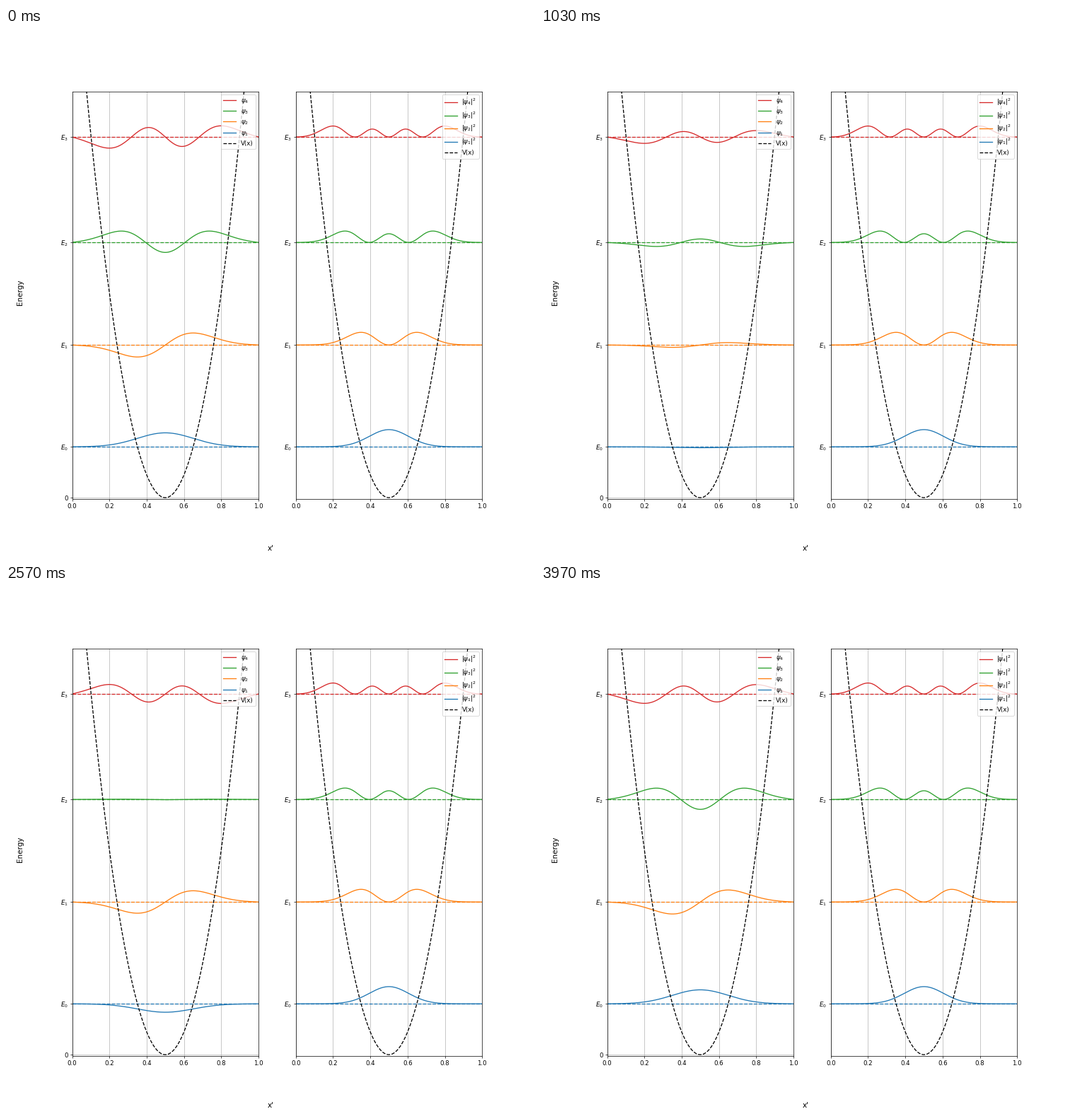
Write a matplotlib script that moves like this. It is 748 by 748 pixels and loops after 4010 ms.

```python
import numpy as np
import matplotlib.pyplot as plt
from matplotlib.animation import FuncAnimation

TICK_MS = 10
TICKS = 401
FPS = 30
STEPS = 120
POINTS = 1000
STATES = 4
COLORS = ["tab:blue", "tab:orange", "tab:green", "tab:red"]
LEFT_SIGNS = [1, -1, 1, -1]  # sign of each state near x = 0

x = np.linspace(0, 1, POINTS)
V = 1000 * (x - 0.5) ** 2


def solve():
    """Lowest states of a harmonic well inside hard walls at 0 and 1."""
    h = x[1] - x[0]
    off = np.full(POINTS - 3, -0.5 / h**2)
    H = np.diag(1 / h**2 + V[1:-1]) + np.diag(off, 1) + np.diag(off, -1)
    energy, vec = np.linalg.eigh(H)
    psi = np.zeros((STATES, POINTS))
    for n in range(STATES):
        v = vec[:, n]
        psi[n, 1:-1] = v * LEFT_SIGNS[n] * np.sign(v[POINTS // 10])
    return energy[:STATES], psi


E, psi = solve()
waves = 100 * psi
density = 2000 * psi**2
times = np.linspace(0, 2 * np.pi / E[0], STEPS)


def draw_panel(ax, curves, label):
    """Draw one panel; return its state curves and what lies above them."""
    lines = [None] * STATES
    for n in reversed(range(STATES)):
        ax.axhline(E[n], color=COLORS[n], ls="--")
        lines[n], = ax.plot(x, E[n] + curves[n], color=COLORS[n],
                            label=label % (n + 1))
    well, = ax.plot(x, V, "k--", label="V(x)")
    ax.set_xlim(0, 1)
    ax.set_ylim(-0.5, E[-1] + 20)
    ax.grid()
    legend = ax.legend(loc="upper right")
    return lines, [well, legend, *ax.spines.values()]


def show(artists, visible):
    for artist in artists:
        artist.set_visible(visible)


fig, (left, right) = plt.subplots(1, 2, figsize=(12, 12), dpi=62.334)
names = [f"$E_{n}$" for n in range(STATES)]
wave_lines, overlay = draw_panel(left, waves, r"$\psi_%d$")
draw_panel(right, density, r"$|\psi_%d|^2$")
left.set_yticks([0, *E], ["0", *names])
right.set_yticks(E, names)
labels = [fig.supxlabel("x'"), fig.supylabel("Energy")]

# Render the still parts once, so each frame only redraws the waves
# and the artists on top of them.
moving = wave_lines + overlay
show(moving, False)
fig.canvas.draw()
still = np.array(fig.canvas.buffer_rgba())
show([right, left.xaxis, left.yaxis, left.patch, *labels], False)
show([line for line in left.lines if line not in moving], False)
show(moving, True)
fig.figimage(still, origin="upper", zorder=-1)


def update(tick):
    step = min(int((tick + 0.5) * TICK_MS * FPS / 1000), STEPS - 1)
    for n, line in enumerate(wave_lines):
        line.set_ydata(E[n] + waves[n] * np.cos(E[n] * times[step]))
    return wave_lines


anim = FuncAnimation(fig, update, frames=TICKS, interval=TICK_MS,
                     repeat=True, repeat_delay=0)
plt.show()
```
